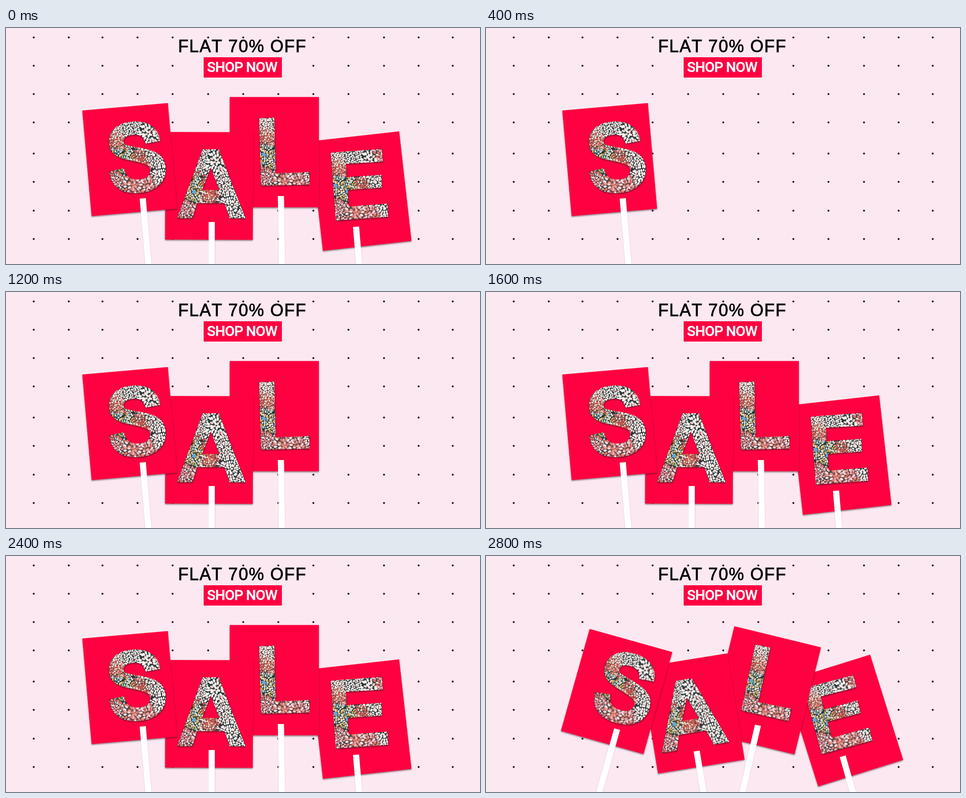
An HTML page with a canvas that plays this animation: 1000x500 px, repeating every 3200 ms.

```html
<!DOCTYPE html>
<html lang="en">
<head>
<meta charset="utf-8">
<title>Sale</title>
<style>
  html, body { margin: 0; overflow: hidden; background: #fce8f1; }
  canvas { display: block; }
</style>
</head>
<body>
<canvas id="stage" width="1000" height="500"></canvas>
<script>
const ctx = document.getElementById('stage').getContext('2d');
const RED = '#ff0140';
const STEP = 400;
const VISIBLE = [4, 1, 2, 3, 4, 4, 4, 4];
const rad = degrees => degrees * Math.PI / 180;

// rest/tilt: card centre x, y and angle. shift: how far letter and stick slide on the card when tilted.
const placards = [
  {
    size: [181, 224.5], rest: [261, 278.8, -5], tilt: [275.5, 287, 15.7], shift: [4.5, -6.8],
    stick: [288.5, 361, 0.086], origin: [217, 198],
    letter: 'M109 41C105 14 86 0 56 0C23 0-1 17 0 45C1 72 24 78 46 83C73 89 87 90 87 105' +
      'C87 117 74 123 60 123C44 123 35 114 32 99L1 106C4 138 26 152 58 152' +
      'C95 151 121 132 120 99C119 70 97 62 68 56C46 52 31 51 31 41C31 33 42 28 55 28C68 28 74 35 78 47Z'
  },
  {
    size: [185, 228], rest: [428.5, 334.5, 0.2], tilt: [436, 333.5, -9.2], shift: [-9.5, 5.2],
    stick: [434, 411, 0], origin: [361, 257],
    letter: 'M0 146H32L42 114H100L111 146H144L88 0H54ZM71 38L53 86H89Z'
  },
  {
    size: [188, 233.5], rest: [566, 263, 0], tilt: [587.5, 284.5, 13.8], shift: [-5.2, -19.5],
    stick: [580, 356, 0.014], origin: [534, 190],
    letter: 'M0 1L32 0L35 118L106 115V142L4 144Z'
  },
  {
    size: [188, 233.5], rest: [749, 345.5, -6.4], tilt: [755.5, 348.5, -17.4], shift: [-7, -0.3],
    stick: [738.5, 421, 0.082], origin: [685, 256],
    letter: 'M0 8L108 0L110 27L32 32L34 60L107 55L108 82L36 87L38 122L120 116L121 144L11 152Z'
  }
];
for (const p of placards) p.shape = new Path2D(p.letter);

// Floral print: loose rings of petals around each flower, cut off where a nearer flower begins.
function makeFloral() {
  const tile = document.createElement('canvas');
  tile.width = tile.height = 160;
  const g = tile.getContext('2d');
  let seed = 7;
  const random = () => (seed = seed * 16807 % 2147483647) / 2147483647;
  const white = ['#fffaf5', '#f8eee8', '#f2d3d0', '#fffaf5'];
  const coral = ['#e9867a', '#f7e6dc', '#d9645a', '#f0b7aa'];
  const pink = ['#efb4c2', '#ea9c98', '#f6dfe0', '#e07c6e'];
  const meadow = ['#e0b567', '#dfe3d8', '#8fb0b0', '#f0e6d6'];
  // x, y, petal length, petal colours, ground
  const flowers = [
    [84, 26, 7, white, '#26363a'], [14, 10, 4.5, white, '#5a4a48'], [20, 38, 4.5, coral, '#8a4a42'],
    [46, 16, 4.5, white, '#26363a'], [10, 78, 5, meadow, '#22383c'], [36, 90, 5, meadow, '#22383c'],
    [66, 92, 4.5, coral, '#a0493f'], [104, 74, 5, white, '#3a3a3c'], [112, 118, 5.5, white, '#33383a'],
    [54, 134, 7, pink, '#8f554e'], [12, 126, 5, pink, '#5d4650'], [84, 138, 6, pink, '#7a4a46'],
    [108, 14, 6, pink, '#6b4a52'], [140, 140, 5, white, '#26363a']
  ];
  const nearest = (x, y) => flowers.reduce((best, f) =>
    Math.hypot(x - f[0], y - f[1]) < Math.hypot(x - best[0], y - best[1]) ? f : best);

  g.fillStyle = '#26363a';
  g.fillRect(0, 0, 160, 160);
  for (const [x, y, , , ground] of flowers) {
    const glow = g.createRadialGradient(x, y, 4, x, y, 28);
    glow.addColorStop(0, ground);
    glow.addColorStop(1, ground + '00');
    g.fillStyle = glow;
    g.fillRect(0, 0, 160, 160);
  }
  for (const flower of flowers) {
    const [cx, cy, size, colors] = flower;
    for (let r = size * 0.7; r < 60; r += size * 1.05) {
      const count = Math.round(2 * Math.PI * r / (size * 0.8));
      const turn = random();
      for (let i = 0; i < count; i++) {
        const angle = (i + turn + random() * 0.4) / count * 2 * Math.PI;
        const distance = r + (random() - 0.5) * size * 0.5;
        const x = cx + distance * Math.cos(angle), y = cy + distance * Math.sin(angle);
        const color = colors[Math.floor(random() * colors.length)];
        if (nearest(x, y) !== flower) continue;
        g.fillStyle = color;
        g.beginPath();
        g.ellipse(x, y, size * 0.52, size * 0.34, angle, 0, 7);
        g.fill();
      }
    }
    if (colors !== meadow) continue;
    g.fillStyle = '#62a8d2';
    g.beginPath();
    g.arc(cx, cy, size * 0.8, 0, 7);
    g.fill();
  }
  return ctx.createPattern(tile, 'repeat');
}
const floral = makeFloral();

function setShadow(alpha, blur, x, y) {
  ctx.shadowColor = `rgba(40,20,30,${alpha})`;
  ctx.shadowBlur = blur;
  ctx.shadowOffsetX = x;
  ctx.shadowOffsetY = y;
}

function drawPlacard({ size: [w, h], rest, tilt, shift, stick, origin, shape }, tilted) {
  const [cx, cy, angle] = tilted ? tilt : rest;
  ctx.save();
  ctx.translate(cx, cy);
  ctx.rotate(rad(angle));
  setShadow(0.5, 3, 0, 2);
  ctx.fillStyle = RED;
  ctx.fillRect(-w / 2, -h / 2, w, h);
  ctx.restore();

  ctx.save();
  ctx.translate(cx, cy);
  if (tilted) ctx.translate(...shift);
  ctx.rotate(rad(angle - rest[2]));
  ctx.translate(-rest[0], -rest[1]);

  const [x, y, lean] = stick;
  setShadow(0.2, 2, 0, 0);
  ctx.strokeStyle = '#fff';
  ctx.lineWidth = 13;
  ctx.beginPath();
  ctx.moveTo(x, y);
  ctx.lineTo(x + lean * 200, y + 200);
  ctx.stroke();

  ctx.translate(...origin);
  setShadow(0.7, 3, 0.5, 1.5);
  ctx.fillStyle = floral;
  ctx.fill(shape, 'evenodd');
  ctx.restore();
}

function drawBackdrop() {
  ctx.fillStyle = '#fce8f1';
  ctx.fillRect(0, 0, 1000, 500);
  ctx.fillStyle = '#1c171a';
  for (const x of [58, 132, 203, 277, 351, 426, 500, 574, 648, 722, 797, 870, 942])
    for (const y of [20, 80, 140, 200, 266, 326, 387, 447]) {
      ctx.beginPath();
      ctx.arc(x + 0.5, y, 2.1, 0, 7);
      ctx.fill();
    }
}

function label(text, x, y, font, color, spacing, weight) {
  ctx.font = font;
  ctx.letterSpacing = spacing;
  ctx.fillStyle = ctx.strokeStyle = color;
  ctx.lineWidth = weight;
  ctx.fillText(text, x, y);
  ctx.strokeText(text, x, y);
}

function drawHeader() {
  ctx.fontKerning = 'none';
  label('FLAT 70% OFF', 363, 50.5, '36px "Liberation Sans", Arial, sans-serif', '#000', '1.6px', 0.8);
  ctx.fillStyle = RED;
  ctx.fillRect(417, 62, 165, 43);
  label('SHOP NOW', 424, 93, '500 30px Roboto, sans-serif', '#fff', '-0.9px', 0.5);
}

function frame() {
  const step = Math.floor(performance.now() / STEP) % VISIBLE.length;
  const tilted = step === 5 || step === 7;
  drawBackdrop();
  drawHeader();
  for (let i = VISIBLE[step] - 1; i >= 0; i--) drawPlacard(placards[i], tilted);
  requestAnimationFrame(frame);
}
frame();
</script>
</body>
</html>
```
